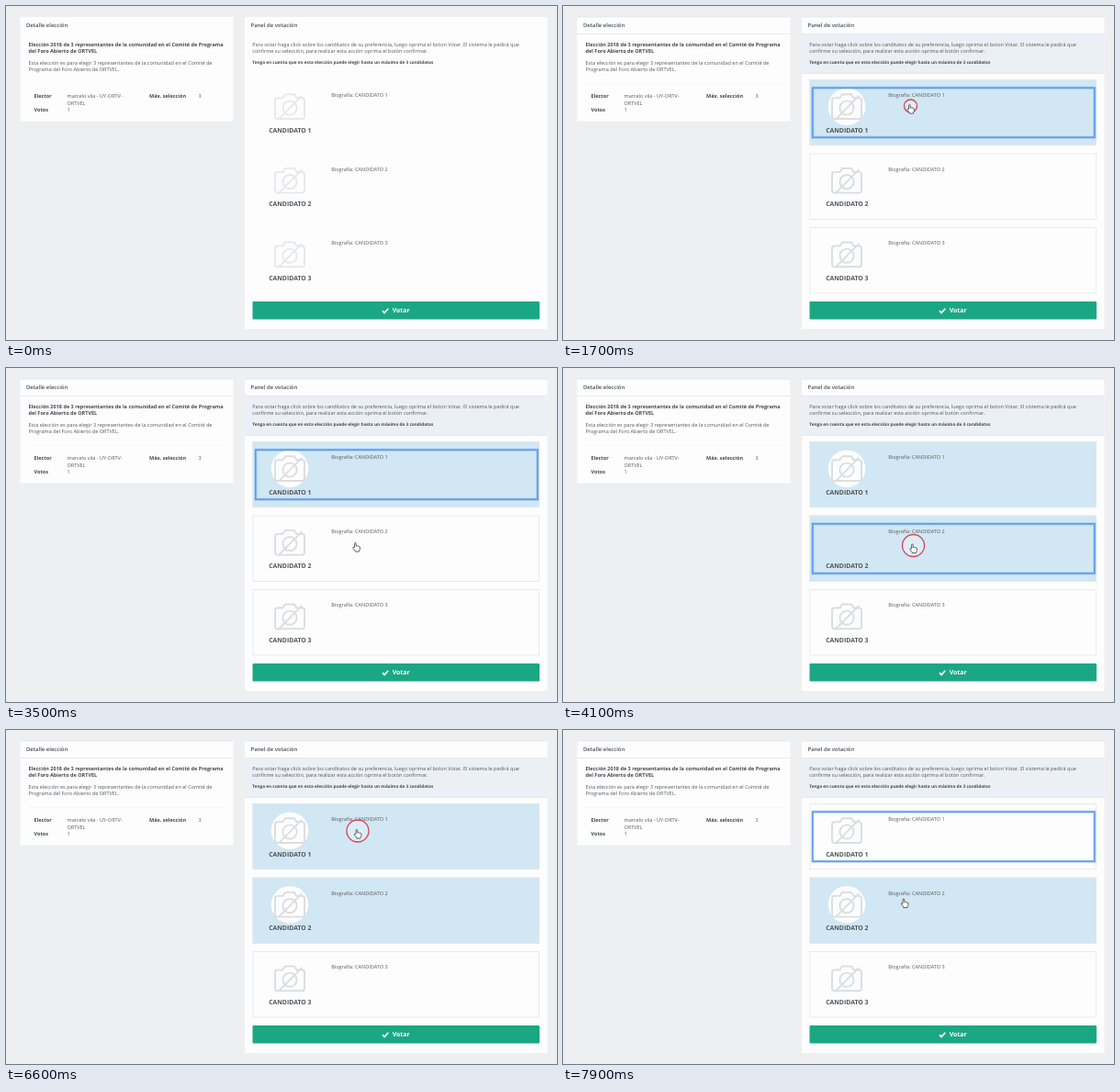
An HTML page that plays this animation: 600 by 364 pixels, repeating every 8 s.

```html
<!DOCTYPE html>
<html lang="es">
<head>
<meta charset="utf-8">
<title>Panel de votación</title>
<style>
  html, body { margin: 0; width: 100%; height: 100%; overflow: hidden; background: #edeff1; }
  svg { display: block; width: 600px; height: 364px; }
  text { font: 5.52px "Open Sans", sans-serif; fill: #56585a; text-rendering: geometricPrecision; }
  .b { font-weight: 700; fill: #48494b; }
  .h { font-size: 5.95px; font-weight: 600; fill: #4d4f51; }
  .note { font-size: 4.7px; font-weight: 700; fill: #48494b; }
  .name { font-size: 6.86px; font-weight: 700; fill: #505254; }
  .vote { font-size: 6.9px; font-weight: 700; fill: #fff; }
  .line { fill: none; stroke: #e4e6e9; stroke-width: .8; }
  .glow { fill: none; stroke: #5c9cec; stroke-opacity: .3; stroke-width: 3.4; }
  .focus { fill: none; stroke: #5c9cec; stroke-width: 1.6; }
  .camera { fill: none; stroke: #dcdddf; stroke-width: 1.9; stroke-linejoin: round; }
</style>
</head>
<body>
<svg viewBox="0 0 600 364">
  <rect width="600" height="364" fill="#edeff1"/>
  <rect x="15.5" y="12" width="232" height="113.5" fill="#fdfdfe"/>
  <rect x="260" y="12" width="329.5" height="340" fill="#fdfdfe"/>
  <g class="detail">
    <rect x="260" y="30.5" width="329.5" height="43" fill="#ebeff6"/>
    <path class="line" d="M15.5 12H247.5M260 12H589.5M15.5 30.5H247.5M260 30.5H589.5M260 73.5H589.5"/>
    <path class="line" d="M24 84.5H239.5" stroke-dasharray="1 1" opacity=".7"/>
  </g>

  <text class="h" x="22" y="23.2">Detalle elección</text>
  <text class="b" x="24.5" y="43.9">Elección 2018 de 3 representantes de la comunidad en el Comité de Programa</text>
  <text class="b" x="24.5" y="51.3">del Foro Abierto de ORTVEL</text>
  <text x="24.5" y="63.5">Esta elección es para elegir 3 representantes de la comunidad en el Comité de</text>
  <text x="24.5" y="70.9">Programa del Foro Abierto de ORTVEL.</text>
  <text class="b" x="30.5" y="100.2">Elector</text>
  <text x="66.5" y="100.2">marcelo vila - UY-ORTV-</text>
  <text x="66.5" y="107.6">ORTVEL</text>
  <text class="b" x="156" y="100.2">Máx. selección</text>
  <text x="209.5" y="100.2">3</text>
  <text class="b" x="30.5" y="115.3">Votos</text>
  <text x="66.5" y="115.3">1</text>

  <text class="h" x="266.5" y="23.2">Panel de votación</text>
  <text x="268.3" y="43.7">Para votar haga click sobre los canditatos de su preferencia, luego oprima el boton Votar. El sistema le pedirá que</text>
  <text x="268.3" y="51.1">confirme su selección, para realizar esta acción oprima el botón confirmar.</text>
  <text class="note" x="268.3" y="63.2">Tenga en cuenta que en esta elección puede elegir hasta un máximo de 3 candidatos</text>

  <g id="cards"></g>

  <rect x="268.5" y="322" width="312.5" height="19.5" rx="1" fill="#1ba784"/>
  <path d="M410 332.2l2.1 2.2 4.2-4.6" fill="none" stroke="#fff" stroke-width="1.7"/>
  <text class="vote" x="420.7" y="334.4">Votar</text>

  <circle id="ring" fill="#fff" fill-opacity=".25" stroke="#d9455a" stroke-width="1.3"/>
  <path id="hand" fill="#fff" stroke="#333" stroke-width=".75" stroke-linejoin="round"
    d="M-1.9 3.6V-.7Q-1.8-1.6-1.1-1.6T-.3-.7V2Q.6 1.4 1.2 2.2 2 1.7 2.6 2.5 3.9 2.2 3.9 3.5V5.2Q3.8 6.4 3 7.1V8.1H-1.3V7.2L-3.7 4.2Q-3.9 3.2-3 3.1Z"/>
</svg>
<script>
const LOOP = 8000, STEP = 100, PITCH = 80.6;
const $ = (sel, root = document) => root.querySelector(sel);

const cardMarkup = n => `
  <g transform="translate(0 ${(n - 1) * PITCH})">
    <rect class="fill" x="268.5" y="80" width="312.5" height="72" fill="#d1e7f3"/>
    <rect class="line detail" x="268.9" y="80.4" width="311.7" height="71.4"/>
    <g class="icon">
      <circle class="disc" cx="309" cy="109.7" r="20.3" fill="#fdfdfe"/>
      <g class="camera">
        <path d="M295.5 100.3H301.5L304 96.3H314L316.5 100.3H322.5Q325 100.3 325 102.8V120.5Q325 123 322.5 123H295.5Q293 123 293 120.5V102.8Q293 100.3 295.5 100.3Z"/>
        <circle cx="309" cy="111" r="7.6"/>
        <path d="M296.5 123.8L322.3 97.6"/>
      </g>
    </g>
    <g class="outline">
      <rect class="glow" x="271.8" y="89.2" width="307" height="54"/>
      <rect class="focus" x="271.8" y="89.2" width="307" height="54"/>
    </g>
    <text class="name" x="286.2" y="137.6">CANDIDATO ${n}</text>
    <text x="354.3" y="99">Biografía: CANDIDATO ${n}</text>
  </g>`;
$("#cards").innerHTML = [1, 2, 3].map(cardMarkup).join("");

const cards = [...$("#cards").children].map(g => ({
  fill: $(".fill", g), icon: $(".icon", g), disc: $(".disc", g), outline: $(".outline", g)
}));
const details = document.querySelectorAll(".detail");
const cameras = document.querySelectorAll(".camera");
const ring = $("#ring"), hand = $("#hand");

// [time, x, y] of the pointer's hot spot
const path = [
  [300, 430, 226], [1200, 378.5, 109], [2100, 378.5, 109], [3500, 381.5, 192],
  [3600, 381.5, 192], [3800, 381.5, 193.5], [4900, 381.5, 193.5], [5600, 381.5, 137.5],
  [6200, 383, 110], [7300, 383, 110], [7900, 372, 185.5]
];
// [time, radius] of the click ring
const rings = [
  [0, 0], [1600, 12], [1700, 7], [1800, 0],
  [4000, 8], [4100, 12], [4200, 7], [4300, 0],
  [6500, 8], [6600, 12], [6700, 7], [6800, 0]
];
// [time, focused card]
const focus = [[0, 0], [1600, 1], [4000, 0], [4100, 2], [6500, 0], [6700, 1]];
const chosen = [[1600, 6700], [4100, LOOP], [LOOP, LOOP]];

const held = (table, t) => table.filter(row => row[0] <= t).pop()[1];
const show = (el, on) => el.setAttribute("opacity", +on);

function pointAt(t) {
  const i = path.findIndex(p => p[0] > t);
  if (i < 0) return path[path.length - 1].slice(1);
  if (i === 0) return path[0].slice(1);
  const [t0, x0, y0] = path[i - 1], [t1, x1, y1] = path[i];
  const k = (t - t0) / (t1 - t0);
  return [x0 + (x1 - x0) * k, y0 + (y1 - y0) * k];
}

function draw(t) {
  const sharp = Math.min(1, Math.max(0, (t - 200) / 900));
  details.forEach(el => { el.style.opacity = sharp; });
  cameras.forEach(el => { el.style.opacity = .65 + .35 * sharp; });

  const active = held(focus, t);
  cards.forEach((card, i) => {
    const [from, to] = chosen[i];
    const on = t >= from && t < to;
    show(card.fill, on);
    show(card.disc, on);
    show(card.icon, !(on && t < from + STEP));
    show(card.outline, active === i + 1);
  });

  const [x, y] = pointAt(t), r = held(rings, t);
  const place = `translate(${x} ${y})`;
  hand.setAttribute("transform", place);
  show(hand, t >= 300);
  ring.setAttribute("transform", place);
  ring.setAttribute("r", r);
  show(ring, r > 0);
}

const start = performance.now();
function tick(now) {
  const t = Math.max(0, now - start) % LOOP;
  draw(Math.floor(t / STEP) * STEP);
  requestAnimationFrame(tick);
}
draw(0);
requestAnimationFrame(tick);
</script>
</body>
</html>
```
